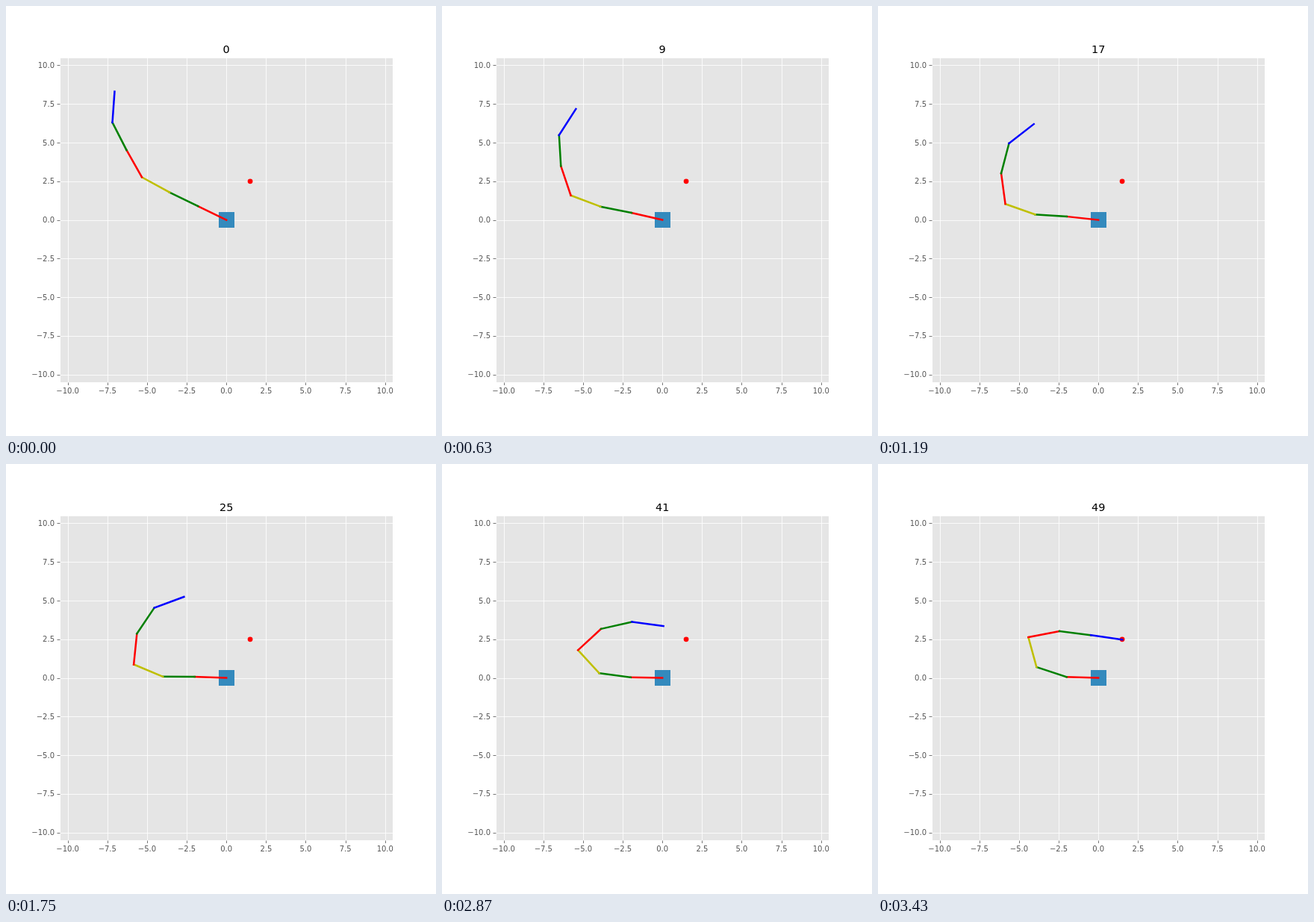
These frames come from a looping animation (576x576 px, 3.5 s). An HTML page with a canvas:

```html
<!DOCTYPE html>
<html lang="en">
<head>
<meta charset="utf-8">
<title>Robot arm</title>
<style>
  html, body { margin: 0; width: 100%; height: 100%; overflow: hidden; background: #fff; }
  canvas { display: block; }
</style>
</head>
<body>
<canvas id="plot" width="576" height="576"></canvas>
<script>
const ctx = document.getElementById('plot').getContext('2d');
const STEP = 70, STEPS = 50, LINK = 2;
const COLORS = ['#f00', '#008000', '#bfbf00', '#f00', '#008000', '#00f'];

// Absolute link angles in degrees at a few steps of the reach.
const KEYS = [0, 9, 17, 25, 33, 41, 49];
const ANGLES = [
  [153.5, 166.8, 173.7, 178.0, 179.5, 179.0, 178.2],
  [153.5, 168.3, 176.3, 179.6, 178.7, 172.1, 161.4],
  [150.7, 158.8, 160.0, 156.8, 148.1, 131.9, 105.0],
  [118.9, 108.2, 97.5, 84.3, 67.1, 43.4, 11.2],
  [116.5, 93.3, 75.7, 56.8, 36.1, 13.1, -7.3],
  [86.0, 58.0, 38.6, 20.8, 5.3, -7.8, -8.5]
];

const px = x => 295.2 + x * 446.4 / 21;
const py = y => 286.56 - y * 434.88 / 21;
const snap = v => Math.floor(v + 0.5) + 0.5;

function line(x1, y1, x2, y2, color, width) {
  ctx.strokeStyle = color;
  ctx.lineWidth = width;
  ctx.beginPath();
  ctx.moveTo(x1, y1);
  ctx.lineTo(x2, y2);
  ctx.stroke();
}

function text(str, x, y, size, color, align) {
  ctx.font = size + 'px "DejaVu Sans", sans-serif';
  ctx.fillStyle = color;
  ctx.textAlign = align;
  ctx.fillText(str, x, y);
}

// Slope at key i of the parabola through it and its neighbours.
function slope(v, i) {
  const m = Math.min(Math.max(i, 1), KEYS.length - 2);
  const h0 = KEYS[m] - KEYS[m - 1], h1 = KEYS[m + 1] - KEYS[m];
  const d0 = (v[m] - v[m - 1]) / h0, d1 = (v[m + 1] - v[m]) / h1;
  const curve = (d1 - d0) / (h0 + h1);
  return d0 + curve * h0 + 2 * curve * (KEYS[i] - KEYS[m]);
}

// Cubic Hermite interpolation between keys.
function angleAt(v, step) {
  let i = 0;
  while (i < KEYS.length - 2 && step >= KEYS[i + 1]) i++;
  const h = KEYS[i + 1] - KEYS[i], u = (step - KEYS[i]) / h, w = 1 - u;
  return w * w * ((1 + 2 * u) * v[i] + u * h * slope(v, i)) +
         u * u * ((3 - 2 * u) * v[i + 1] - w * h * slope(v, i + 1));
}

function drawAxes() {
  ctx.fillStyle = '#fff';
  ctx.fillRect(0, 0, 576, 576);
  ctx.fillStyle = '#e5e5e5';
  ctx.fillRect(73, 70, 445, 434);
  ctx.lineCap = 'butt';
  for (let v = -10; v <= 10; v += 2.5) {
    const x = snap(px(v)), y = snap(py(v));
    const label = (v < 0 ? '\u2212' : '') + Math.abs(v).toFixed(1);
    line(x, 70, x, 504, '#fff', 0.8);
    line(73, y, 518, y, '#fff', 0.8);
    line(x, 504.5, x, 508, '#555', 0.8);
    line(68.5, y, 72.5, y, '#555', 0.8);
    text(label, px(v), 519, 10, '#555', 'center');
    text(label, 65, Math.round(py(v) + 3.6), 10, '#555', 'right');
  }
}

function drawArm(step) {
  let x = 0, y = 0;
  ctx.lineCap = 'square';
  ANGLES.forEach((v, i) => {
    const a = angleAt(v, step) * Math.PI / 180;
    const nx = x + LINK * Math.cos(a), ny = y + LINK * Math.sin(a);
    line(px(x), py(y), px(nx), py(ny), COLORS[i], 2.5);
    x = nx;
    y = ny;
  });
}

function draw(step) {
  drawAxes();
  ctx.fillStyle = '#348abd';
  ctx.fillRect(285, 276, 21, 21);
  ctx.fillStyle = '#f00';
  ctx.beginPath();
  ctx.arc(px(1.5), py(2.5), 3.4, 0, Math.PI * 2);
  ctx.fill();
  drawArm(step);
  text(step, 295.2, 63, 14.4, '#000', 'center');
}

const start = performance.now();
function tick() {
  draw(Math.floor((performance.now() - start) / STEP) % STEPS);
  requestAnimationFrame(tick);
}
tick();
</script>
</body>
</html>
```
